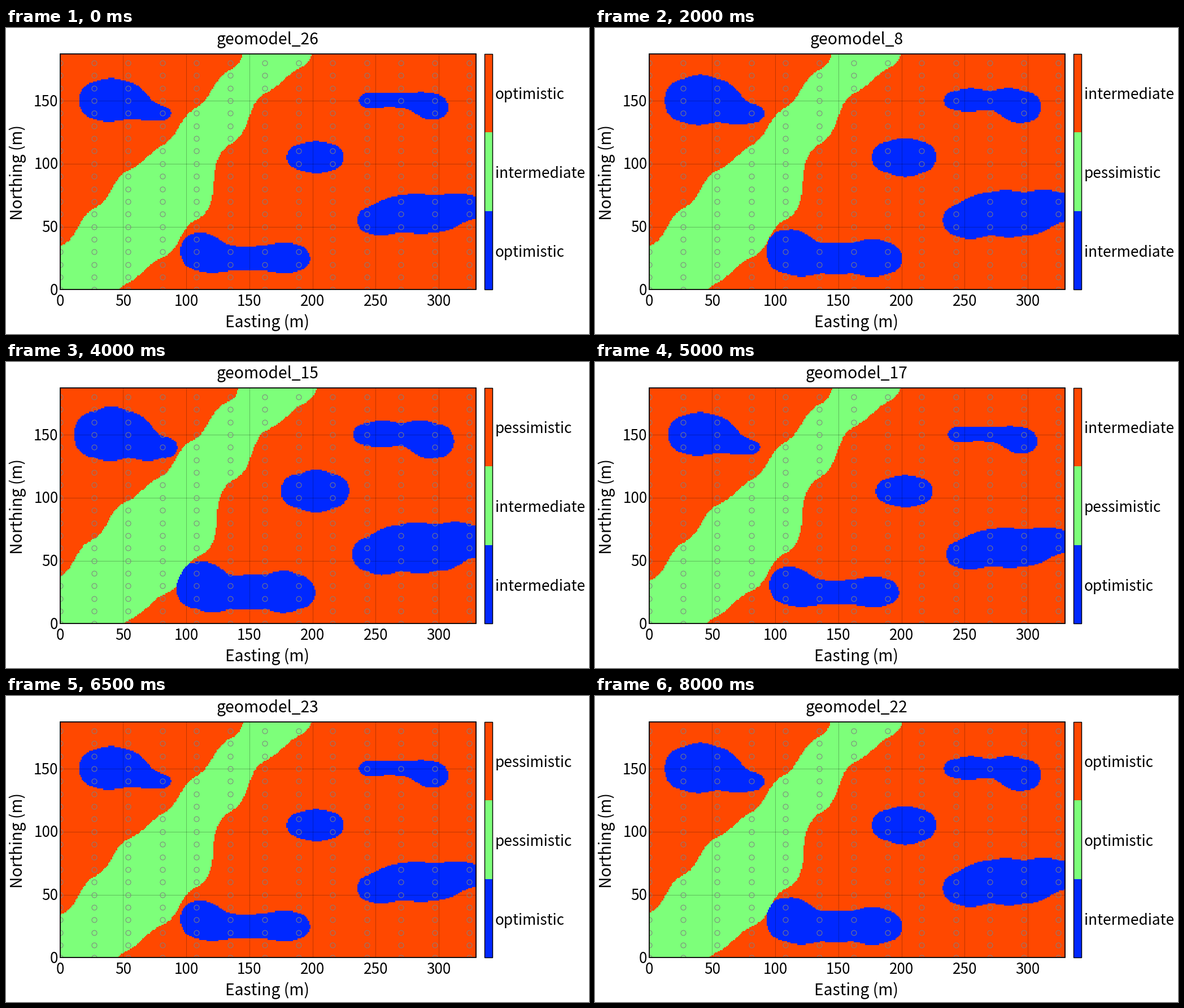
Recreate the animation shown at these times as a matplotlib script. Size 1032 by 543 pixels, loop 8.5 s.

```python
import numpy as np
import matplotlib.pyplot as plt
from matplotlib.animation import FuncAnimation
from matplotlib.patches import Rectangle

W, H, DPI = 1032, 543, 64
PT = 72 / DPI
LEFT, RIGHT, TOP, BOTTOM = 95.5, 832, 45.5, 464.3
SCALE = 2.235                      # pixels per metre
COLS, ROWS = 330, 188              # cells of one metre
DX, DY = 27, 10                    # well spacing in metres
WELL_COLS, WELL_ROWS = 13, 19
COLORS = np.array([(255, 72, 0), (125, 255, 122), (0, 40, 255)], dtype=np.uint8)
NAMES = {"o": "optimistic", "i": "intermediate", "p": "pessimistic"}

plt.rcParams["font.family"] = "Noto Sans CJK JP"

# Wells that hit each rock: well column, first row, last row
BAND = [(0, 0, 3), (1, 0, 6), (2, 1, 9), (3, 3, 11),
        (4, 6, 14), (5, 12, 17), (6, 16, 18), (7, 18, 18)]
BODIES = [(1, 14, 16), (2, 14, 16), (3, 14, 14),
          (4, 2, 4), (5, 2, 3), (6, 2, 3), (7, 2, 3),
          (7, 10, 11), (8, 10, 11),
          (9, 15, 15), (10, 15, 15), (11, 14, 15),
          (9, 5, 6), (10, 5, 7), (11, 5, 7), (12, 6, 7)]

# Model number, labels from top to bottom, cut-off distance of band and bodies
MODELS = [
    (26, "oio", 1, 0), (1, "opp", -1, -3.5), (4, "poo", -1, 0),
    (6, "ioo", -5, 7), (8, "ipi", 1, -5), (11, "oip", -1, -3.5),
    (13, "pop", -1, -3.5), (14, "oii", -1, -5), (15, "pii", -5, -7.5),
    (16, "iip", -1, -3.5), (17, "ipo", 2, 0), (18, "poi", 9.5, -9.8),
    (21, "iio", 1, 0), (23, "ppo", 2, 0), (24, "iop", -1, -3.5),
    (25, "opi", 1, -5), (22, "ooi", -1, -5),
]


def grid_points(xs, ys):
    return np.stack(np.meshgrid(xs, ys), axis=-1).reshape(-1, 2).astype(float)


def hits(spans):
    """Mark the wells that lie in the given column spans."""
    mask = np.zeros((WELL_ROWS, WELL_COLS), dtype=bool)
    for col, first, last in spans:
        mask[first:last + 1, col] = True
    return mask.ravel()


def squared_distance(a, b):
    return sum((a[:, None, k] - b[None, :, k]) ** 2 for k in (0, 1))


def signed_distance(points, inside):
    """Distance to the nearest well of the other kind, positive inside."""
    d = np.sqrt(squared_distance(points, points))
    other = inside[:, None] != inside[None, :]
    return np.where(other, d, np.inf).min(axis=1) * np.where(inside, 1, -1)


def thin_plate(a, b):
    d2 = squared_distance(a, b)
    return d2 * np.log(d2 + 1e-12)


def interpolate(points, values, targets):
    """Thin-plate spline through the values, evaluated at the targets."""
    points, targets = points / 100, targets / 100
    n = len(points)
    linear = np.column_stack([np.ones(n), points])
    system = np.block([[thin_plate(points, points), linear],
                       [linear.T, np.zeros((3, 3))]])
    weights = np.linalg.solve(system, np.append(values, np.zeros(3)))
    parts = [thin_plate(part, points) @ weights[:n] + weights[n] + part @ weights[n + 1:]
             for part in np.array_split(targets, 10)]
    return np.concatenate(parts).reshape(ROWS, COLS)


wells = grid_points(DX * np.arange(WELL_COLS), DY * np.arange(WELL_ROWS))
cells = grid_points(np.arange(COLS) + 0.5, np.arange(ROWS) + 0.5)
in_band, in_body = hits(BAND), hits(BODIES)

body_field = interpolate(wells, signed_distance(wells, in_body), cells)
# The bodies replace older rock, so their wells say nothing about the band.
host = wells[~in_body]
band_field = interpolate(host, signed_distance(host, in_band[~in_body]), cells)


def geology(band_cut, body_cut):
    band, body = band_field - band_cut, body_field - body_cut
    rock = np.where(band > 0, 1, 0)
    rock[(body > 0) & (body > band)] = 2
    return COLORS[rock]


fig = plt.figure(figsize=(W / DPI, H / DPI), dpi=DPI, facecolor="white")
ax = fig.add_axes([0, 0, 1, 1])
ax.axis("off")


def text(x, y, s, px, **kw):
    return ax.text(x, y, s, fontsize=px * PT, va="baseline", **kw)


def box(x0, y0, x1, y1, **kw):
    return ax.add_patch(Rectangle((x0, y0), x1 - x0, y1 - y0, **kw))


def grid_line(xs, ys):
    ax.plot(xs, ys, color="black", alpha=0.5, lw=PT, ls=(0, (1, 1)), zorder=2)


image = ax.imshow(np.zeros((ROWS, COLS, 3), dtype=np.uint8), origin="lower",
                  interpolation="nearest", aspect="auto",
                  extent=(LEFT, LEFT + COLS * SCALE, BOTTOM, BOTTOM - ROWS * SCALE))
ax.set(xlim=(0, W), ylim=(H, 0))
frame = box(LEFT, TOP, RIGHT, BOTTOM, fill=False, ec="black", lw=1.8 * PT, zorder=5)
image.set_clip_path(frame)

circles, = ax.plot(LEFT + SCALE * wells[:, 0], BOTTOM - SCALE * wells[:, 1], "o",
                   ms=9 * PT, mfc="none", mec="#808080", mew=PT, zorder=3)
circles.set_clip_path(frame)

for metres in range(0, 301, 50):
    x = LEFT + SCALE * metres
    text(x, 493, str(metres), 26.2, ha="center")
    if metres:
        grid_line([x, x], [TOP, BOTTOM])
for metres in range(0, 151, 50):
    y = BOTTOM - SCALE * metres
    text(92.5, y + 9.5, str(metres), 26.2, ha="right")
    if metres:
        grid_line([LEFT, RIGHT], [y, y])

text(463, 531, "Easting (m)", 28.3, ha="center")
text(29, 256, "Northing (m)", 28.3, ha="center", rotation=90, rotation_mode="anchor")
title = text(463, 29, "", 28.3, ha="center")

bar_step = (BOTTOM - TOP) / 3
for i, color in enumerate(COLORS / 255):
    box(846.5, TOP + bar_step * i, 860.5, TOP + bar_step * (i + 1), fc=color, ec="none")
box(846.5, TOP, 860.5, BOTTOM, fill=False, ec="black", lw=1.4 * PT, zorder=5)
labels = [text(865.5, 126 + 140 * i, "", 26.2, ha="left") for i in range(3)]


def update(i):
    number, codes, band_cut, body_cut = MODELS[i]
    image.set_data(geology(band_cut, body_cut))
    title.set_text(f"geomodel_{number}")
    for label, code in zip(labels, codes):
        label.set_text(NAMES[code])
    return [image, title, *labels]


anim = FuncAnimation(fig, update, frames=len(MODELS), interval=500,
                     repeat=True, repeat_delay=0, blit=False)
plt.show()
```
